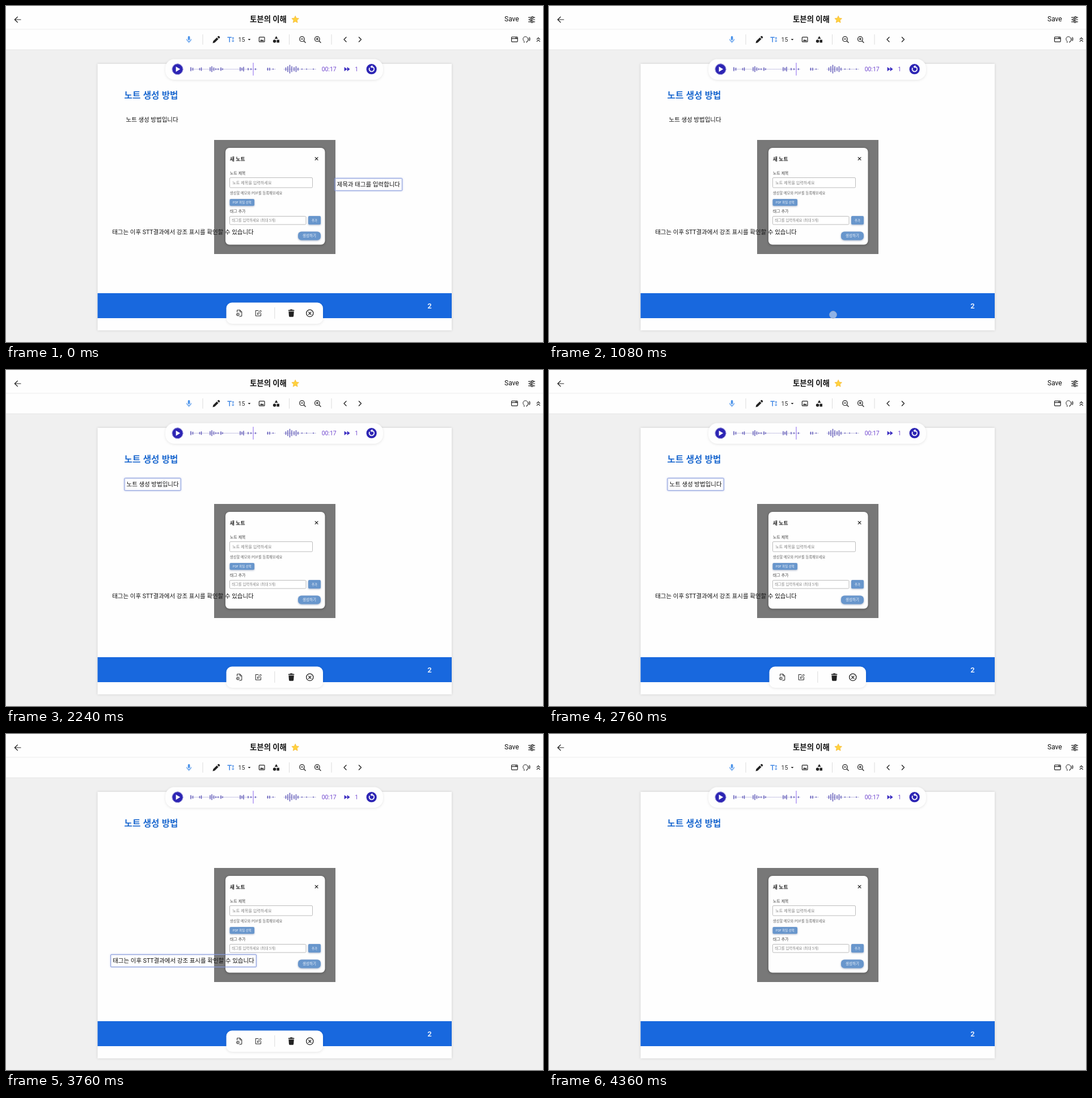
Write an HTML page that moves like this. It is 947 px wide and 592 px high and loops after 4600 ms.

```html
<!DOCTYPE html>
<html lang="ko">
<head>
<meta charset="utf-8">
<title>Note editor</title>
<style>
html, body { margin: 0; width: 100%; height: 100%; overflow: hidden; background: #f0f0f0; }
svg { display: block; width: 947px; height: 592px; }
text { font-family: Roboto, "Noto Sans CJK KR", "Noto Sans CJK", sans-serif; fill: #111; white-space: pre; }
.kr text { font-family: "Noto Sans CJK KR", "Noto Sans CJK", sans-serif; }
.mid { text-anchor: middle; }
.line { fill: none; stroke: #222; stroke-width: 1.2; stroke-linecap: round; stroke-linejoin: round; }
.rule { stroke: #dcdcdc; fill: none; }
.note { font-size: 10.5px; }
.field { fill: #fff; stroke: #bcbcbc; }
.dot { fill: rgba(225,228,235,.6); stroke: rgba(165,172,186,.75); stroke-width: 1; opacity: 0; }
.frame { fill: none; stroke: #8c9fdc; filter: drop-shadow(0 0 1.5px rgba(90,115,215,.55)); }
.soft { filter: drop-shadow(0 1px 2px rgba(0,0,0,.10)); }
</style>
</head>
<body>
<svg viewBox="0 0 947 592">
  <rect width="947" height="592" fill="#f0f0f0"/>

  <!-- page -->
  <rect x="161.5" y="102" width="624.5" height="469.5" fill="#fefefe" style="filter:drop-shadow(0 0 2px rgba(0,0,0,.14))"/>
  <rect x="161.5" y="506" width="624.5" height="44" fill="#1868de"/>
  <text x="747" y="532.6" class="mid" font-size="13" font-weight="700" style="fill:#e3ecfb">2</text>
  <g class="kr"><text x="208.6" y="163.4" font-size="15.6" font-weight="700" style="fill:#1b68cf">노트 생성 방법</text></g>

  <!-- dialog picture -->
  <rect x="367" y="236" width="214" height="201" fill="#787878"/>
  <g class="kr">
    <rect x="387" y="250" width="175.5" height="170.5" rx="7" fill="#fefefe" style="filter:drop-shadow(0 1px 2px rgba(0,0,0,.3))"/>
    <text x="394.8" y="273" font-size="8.8" font-weight="700" style="fill:#222">새 노트</text>
    <path d="M545.2 266.6l4.8 4.8m0-4.8l-4.8 4.8" class="line"/>
    <text x="394.8" y="296.6" font-size="7" style="fill:#444">노트 제목</text>
    <rect x="394.5" y="302.5" width="146" height="17.5" rx="1.5" class="field"/>
    <text x="399.2" y="313.8" font-size="7.1" style="fill:#858585">노트 제목을 입력하세요</text>
    <text x="394.8" y="331.6" font-size="6.3" style="fill:#666">생성할 메모와 PDF를 등록해보세요</text>
    <g style="filter:drop-shadow(0 1px 1.5px rgba(50,80,130,.45))" fill="#6896cc">
      <rect x="394.5" y="340" width="43.5" height="12" rx="2"/>
      <rect x="533" y="370" width="22" height="15" rx="2"/>
      <rect x="515" y="397.5" width="40" height="15" rx="6"/>
    </g>
    <g class="mid">
      <text x="416.2" y="348" font-size="5.4" style="fill:#f0f5fc">PDF 파일 선택</text>
      <text x="544" y="379.5" font-size="5.5" style="fill:#f0f5fc">추가</text>
      <text x="535" y="407.4" font-size="6.5" style="fill:#f0f5fc">생성하기</text>
    </g>
    <text x="394.8" y="364.3" font-size="7" style="fill:#444">태그 추가</text>
    <rect x="394.5" y="370.5" width="134.5" height="14.5" rx="1.5" class="field"/>
    <text x="398.2" y="380" font-size="6.35" style="fill:#858585">태그를 입력하세요 (최대 5개)</text>
  </g>

  <g id="notes"></g>

  <!-- header -->
  <rect width="947" height="77" fill="#fefefe"/>
  <path d="M0 41H947" class="rule" style="stroke:#ececec"/>
  <path d="M0 77H947" class="rule" style="stroke:#e6e6e6"/>
  <path d="M26 24H15.5m4.8-4.8L15.3 24l5 4.8" class="line"/>
  <text x="430" y="28.2" font-size="13.4" font-weight="700">토븐의 이해</text>
  <path id="star" fill="#ffd23c" stroke="#f6b936" stroke-width=".8" stroke-linejoin="round"/>
  <text x="879" y="27.3" font-size="12">Save</text>
  <g class="line">
    <path d="M921.5 20.2h5m4 0h2M921.5 24h2m4 0h5M921.5 27.8h4m4 0h3"/>
    <circle cx="928.4" cy="20.2" r="1.6"/><circle cx="925.4" cy="24" r="1.6"/><circle cx="927.6" cy="27.8" r="1.6"/>
  </g>

  <!-- tools -->
  <path d="M347 50V68M499.5 50V68M574 50V68" class="rule"/>
  <rect x="320.8" y="53" width="3.6" height="7.4" rx="1.8" fill="#4a92ea"/>
  <path d="M318.9 58.6a3.7 3.7 0 0 0 7.4 0M322.6 62.4v2.2" class="line" style="stroke:#4a92ea"/>
  <path d="M364.5 65.5l.9-3.7 6.4-6.4 2.8 2.8-6.4 6.4zM372.7 54.5l1.3-1.3q1-.8 2 .1l.9.9q.9 1 0 1.9l-1.3 1.3z" fill="#222"/>
  <path d="M391 55.3h6.4M394.2 55.3v8" class="line" style="stroke:#3f86e4;stroke-width:1.5"/>
  <path d="M400.3 55.4v7.4m-1.5-6l1.5-1.6 1.5 1.6m-3 4.7l1.5 1.6 1.5-1.6" class="line" style="stroke:#3f86e4;stroke-width:1"/>
  <text x="409.6" y="62.6" font-size="10.6" style="fill:#333">15</text>
  <path d="M426.6 58h4.8l-2.4 2.6z" fill="#222"/>
  <rect x="446.4" y="54.8" width="9.6" height="8.4" rx="1" class="line"/>
  <path d="M447.8 61.8l2.2-3 1.6 1.8 1.4-1.4 1.8 2.6z" fill="#222"/>
  <path d="M476.6 53l2.9 4.8h-5.8zM477.4 59.4h4.6v5.2h-4.6z" fill="#222"/><circle cx="473.6" cy="62" r="2.8" fill="#222"/>
  <g class="line">
    <circle cx="522" cy="58.2" r="4.3"/><path d="M525.2 61.5l3 3M520.2 58.2h3.6"/>
    <circle cx="548.8" cy="58.2" r="4.3"/><path d="M552 61.5l3 3M547 58.2h3.6m-1.8-1.8v3.6"/>
    <path d="M600 55l-4 4 4 4M622.4 55l4 4-4 4" style="stroke-width:1.4"/>
    <rect x="891.5" y="54.5" width="10.6" height="8.6" rx="1"/><path d="M891.5 57.4h10.6M898.5 56h2"/>
    <path d="M913.8 64.5v-2.4q-2-1.4-2-3.8a4.2 4.2 0 0 1 8.4-.3l1 2-1 .5v1.8h-2v2.2M922 56.4q1.2 1.8 0 4M923.4 55q2 3 0 6.4" style="stroke-width:1"/>
    <path d="M936.2 58.6l2.6-2.6 2.6 2.6M936.2 62.4l2.6-2.6 2.6 2.6"/>
  </g>

  <!-- player -->
  <rect x="281" y="93.5" width="384" height="36.5" rx="16" fill="#fefefe" class="soft"/>
  <circle cx="302.5" cy="111.3" r="9" fill="#2d25b4"/>
  <circle cx="302.5" cy="111.3" r="9.4" fill="none" stroke="#2d25b4" stroke-dasharray="1.6 .9"/>
  <path d="M299.6 106.7l7.6 4.6-7.6 4.6z" fill="#fff"/>
  <path d="M325 111.3H443M460 111.3H475M490 111.3H547" stroke="#8a84c8" stroke-dasharray="1.2 1.1" stroke-width=".9"/>
  <path id="wave" stroke="#6059b8" stroke-width="1.5"/>
  <path d="M436 100V122.5" stroke="#9a7cf0" stroke-width="1.2"/>
  <text x="556.7" y="114.9" font-size="10.4" style="fill:#7046cf">00:17</text>
  <path d="M596.6 107.6l5 3.7-5 3.7zM601.6 107.6l5 3.7-5 3.7z" fill="#3a2cc0"/>
  <text x="615.3" y="114.9" font-size="10.4" style="fill:#7c55d4">1</text>
  <circle cx="644.6" cy="111.2" r="9.1" fill="#2d25b4"/>
  <path d="M641.2 108.9a4.3 4.3 0 1 0 4.2-2" fill="none" stroke="#fff" stroke-width="1.7"/>
  <path d="M646.2 104.2v5.4l-4-2.4z" fill="#fff"/>

  <!-- action bar -->
  <g id="bar">
    <rect x="388.5" y="522.5" width="170.5" height="37.5" rx="10" fill="#fefefe" class="soft"/>
    <path d="M473.8 531V551" class="rule"/>
    <g class="line" style="stroke-width:1">
      <path d="M407.6 539.2v-3.4h5.2l3 3v7.6h-2.4M412.6 536v3h3M406.8 542.2l2-1.2v5l-2-1.2zM410.6 541q1.6 2.4 0 5M412 547.2h1"/>
      <path d="M445 536.6h-4.8v9.4h9.2v-4.6M443.4 543l.4-2 5-5 1.6 1.6-5 5z"/>
      <circle cx="535.8" cy="541.3" r="6.1" style="stroke-width:1.3"/><path d="M533.6 539.1l4.4 4.4m0-4.4l-4.4 4.4" style="stroke-width:1.3"/>
    </g>
    <path d="M497.8 536.4q0-1 1-1h2l.6-.8h3.4l.6.8h2q1 0 1 1v.8h-10.6zM498.4 538.2h9.4l-.6 8q-.2 1.6-1.6 1.6h-5q-1.4 0-1.6-1.6z" fill="#222"/>
  </g>

  <g id="taps"></g>
</svg>
<script>
const LOOP = 4600;
const NS = "http://www.w3.org/2000/svg";
const $ = id => document.getElementById(id);

function add(parent, tag, attrs, text) {
  const el = document.createElementNS(NS, tag);
  for (const k in attrs) el.setAttribute(k, attrs[k]);
  if (text) el.textContent = text;
  parent.append(el);
  return el;
}

// steps: [ms, opacity]; hard holds each value until the next step
function play(el, steps, hard) {
  const rows = [...steps, [LOOP, steps[steps.length - 1][1]]];
  el.animate(rows.map(([ms, opacity]) => ({
    offset: ms / LOOP, opacity, easing: hard ? "steps(1, end)" : "linear"
  })), { duration: LOOP, iterations: Infinity });
}

// on/off windows as hard steps
function show(el, spans) {
  const steps = spans[0][0] > 0 ? [[0, 0]] : [];
  for (const [on, off] of spans) steps.push([on, 1], [off, 0]);
  play(el, steps, true);
}

// x, y: resting text start and baseline; select and remove times
const notes = [
  { text: "제목과 태그를 입력합니다", x: 582.5, y: 317.4, w: 119, pick: 0, drop: 1040 },
  { text: "노트 생성 방법입니다", x: 211.5, y: 204.2, w: 99.5, pick: 2160, drop: 2960 },
  { text: "태그는 이후 STT결과에서 강조 표시를 확인할 수 있습니다", x: 187.2, y: 402.4, w: 257, pick: 3520, drop: 4120 }
];

for (const n of notes) {
  if (n.pick) {
    const idle = add($("notes"), "text", { x: n.x, y: n.y, class: "note" }, n.text);
    show(idle, [[0, n.pick]]);
  }
  const box = add($("notes"), "g", {});
  add(box, "rect", { x: n.x - 2.7, y: Math.round(n.y - 14) + .5, width: n.w, height: 22, rx: 1.5, class: "frame" });
  add(box, "text", { x: n.x + 1, y: n.y + 1, class: "note" }, n.text);
  show(box, [[n.pick, n.drop]]);
}
show($("bar"), notes.map(n => [n.pick, n.drop]));

// x, y, touch down, release, gone
const taps = [
  [501, 544, 880, 1080, 1200],
  [278.5, 200.5, 2000, 2120, 2280],
  [501, 544, 2840, 3000, 3120],
  [313, 399.5, 3340, 3480, 3640],
  [501, 544, 3960, 4160, 4280]
];
for (const [x, y, down, up, gone] of taps) {
  const dot = add($("taps"), "circle", { cx: x, cy: y, r: 6.4, class: "dot" });
  play(dot, [[0, 0], [down - 1, 0], [down, .8], [down + 60, 1], [up, 1], [gone, 0]]);
}

// waveform: x, height
const bars = [
  [326, 7], [329.5, 5], [341.5, 4], [344.5, 6], [360, 7], [363, 10], [366.5, 6], [370, 3], [374, 3],
  [379, 6], [382, 3], [413, 7], [416, 5], [419, 8], [427, 4], [432, 3], [440, 3], [461.5, 5], [465, 5],
  [471, 2], [493.5, 6], [497, 10], [500.5, 15], [504, 10], [508, 7], [511.5, 10], [515, 5], [522, 2], [530, 2], [542, 2]
];
$("wave").setAttribute("d", bars.map(([x, h]) => `M${x} ${111.3 - h / 2}v${h}`).join(""));

const tips = Array.from({ length: 10 }, (_, i) => {
  const a = i * Math.PI / 5 - Math.PI / 2, r = i % 2 ? 3.2 : 6.6;
  return (510.2 + r * Math.cos(a)).toFixed(1) + " " + (24 + r * Math.sin(a)).toFixed(1);
});
$("star").setAttribute("d", "M" + tips.join("L") + "z");
</script>
</body>
</html>
```
